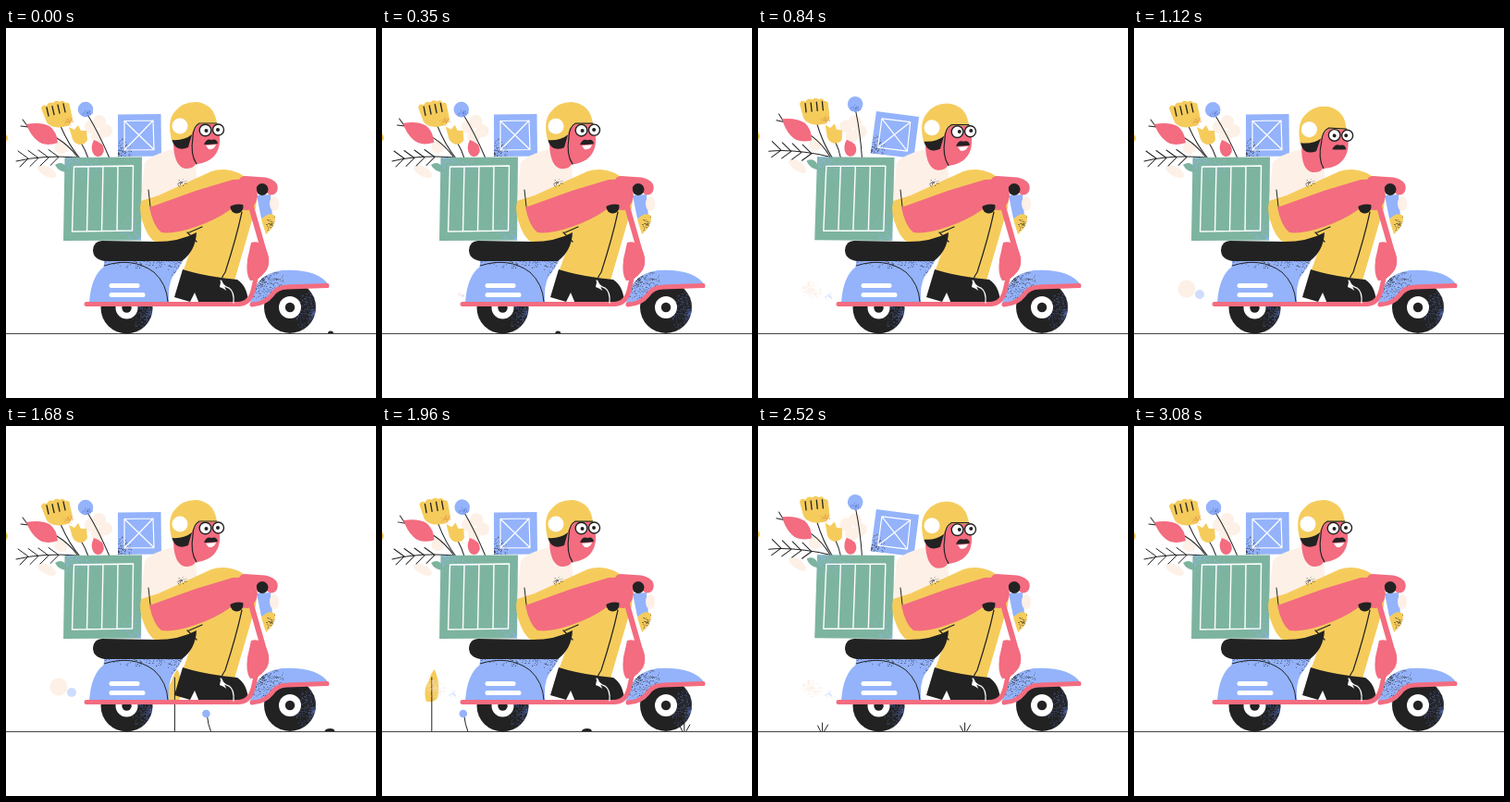
Animation of 400 by 400 pixels, one loop 3150 ms. Source, as an HTML page:

```html
<!DOCTYPE html>
<html lang="en">
<head>
<meta charset="utf-8">
<title>Scooter delivery</title>
<style>
html, body { margin: 0; width: 100%; height: 100%; overflow: hidden; background: #fff; }
svg { display: block; width: 100vw; height: 100vh; }
.k { fill: #222; } .p { fill: #f36c80; } .y { fill: #f5cc5c; } .b { fill: #94b3fb; }
.g { fill: #7db4a0; } .c { fill: #fdf0e6; } .w { fill: #fff; }
.lk, .lw, .lp { fill: none; stroke-linecap: round; stroke-linejoin: round; }
.lk { stroke: #222; } .lw { stroke: #fff; } .lp { stroke: #f36c80; }
</style>
</head>
<body>
<svg viewBox="0 0 400 400">
  <g id="strip">
    <path class="k" d="M348 330a3 2.6 0 0 1 6 0z M1116 330q1-3 6-3t5 3z"/>
    <path class="y" d="M948 298q-4-12 3-23q2-8 6-12q6 14 4 26q0 8-7 9z"/>
    <path class="lk" d="M954 272V330 M989 313q1 10 4 17"/>
    <circle class="b" cx="988" cy="311" r="4.3"/>
  </g>
  <path d="M0 330.5H400" stroke="#444"/>

  <g id="puff">
    <g id="cloud"><circle class="c" r="9.5"/><circle class="b" cx="14" cy="6" r="5" opacity=".45"/></g>
    <g id="dust"></g>
  </g>

  <circle id="edge" class="y" cx="-3" cy="119" r="5"/>
  <g id="load">
    <g id="petals" class="c">
      <circle cx="92" cy="107" r="7"/><circle cx="101" cy="101" r="7"/><circle cx="108" cy="111" r="7"/>
      <circle cx="99" cy="117" r="7"/><circle cx="60" cy="129" r="7"/>
    </g>
    <g id="branch">
      <ellipse class="c" cx="44" cy="155" rx="11" ry="5" transform="rotate(28 44 155)"/>
      <path class="lk" d="M11 144Q40 137 78 140"/>
      <path class="g" d="M53 148q7-5 12 2l2 6q-10 0-14-8z"/>
    </g>
    <g id="bulb">
      <path class="lk" d="M55 119Q68 127 77 139M24 107l-6-8M24 107l-8-1"/>
      <path class="p" d="M22 104Q37 101 47 106Q55 112 56 124Q41 129 33 121Q26 115 22 104Z"/>
    </g>
    <g id="tulip">
      <path class="lk" d="M59 106Q68 127 80 141"/>
      <path class="y" d="M38 87q1-5 6-3q2-5 7-3q3-4 7-1q4-3 6 1q5-1 5 4l3 13q0 7-10 9q-13 2-18-5z"/>
    </g>
    <g id="crown">
      <path class="lk" d="M81 124Q86 132 89 141"/>
      <path class="y" d="M68 107l6 3l4-5l3 6l6 0l1 10q-2 5-9 5q-7-2-8-9z"/>
    </g>
    <path class="p" d="M95 121q6 2 9 5q4 7-1 12q-6 3-9-3q-3-6 1-14z"/>
    <g id="ball">
      <path class="lk" d="M89 95Q101 115 112 141"/>
      <circle class="b" cx="86" cy="88" r="8.3"/>
    </g>
    <g id="box">
      <path id="boxFace" class="b" d="M121 93.500L167.500 93L168 138.500L121 139Z"/>
      <path class="lw" stroke-width="1.2" d="M128 100.500L159 100L160 131.500L128 132ZL160 131.500M159 100L128 132"/>
    </g>
    <path id="crate" class="g" d="M63.500 140L147 139.500L146 229.500L62 230Z"/>
    <path class="lw" stroke-width="1.4" d="M73.500 150L137.500 149L136.500 219L71.500 220ZM89 150L87.500 219.500M105 149.500L103.500 219.500M121 149.500L120 219"/>
  </g>

  <g id="scooter">
    <path id="body" class="b" d="M90 297Q92 268 106 258V250H192Q187 260 180 269Q175 278 176 297Z"/>
    <path class="lk" d="M106 257Q137 247 160 264Q174 277 175 296"/>
    <path class="lw" stroke-width="5" d="M114 278.500H142M114 288.500H148"/>
  </g>

  <g id="rider">
    <path class="c" d="M181 131Q156 137 150 146Q147 168 146 192L170 205L205 185Q207 165 205 148Z"/>
    <path class="y" d="M146 187Q143 200 150 216Q155 228 162 232Q185 233 206 222L191 264Q217 272 247 273L270 194Q274 168 252 157Q236 150 222 155L165 181Z"/>
    <path class="k" d="M104 230L162 231Q188 231 206 221Q205 241 190 252H107Q94 250 94 240Q95 230 104 230Z"/>
    <path class="lk" stroke-width="1.300" d="M196 221L206 231M198 221L212 215"/>
    <path class="k" d="M232 270L250 272Q261 279 262 297H244Z"/>
    <path class="k" d="M191 261Q210 267 233 270L231 280Q246 286 248 298H209L204 286L199 296L182 291Z"/>
  </g>

  <g id="front">
    <path class="b" d="M271 181L286 180L288 204L276 206Z"/>
    <ellipse class="c" cx="290" cy="190" rx="5" ry="8"/>
    <path id="lamp" class="y" d="M276 207Q284 198 291 203Q292 214 281 223Z"/>
    <path id="fender" class="b" d="M264 298Q268 266 298 262Q337 260 349 278L302 279Q289 282 284 291Q277 298 264 298Z"/>
    <path class="lp" stroke-width="5" d="M87 298.500H250Q263 299 267 284L272 262M266 299Q280 298 287 289Q293 280 304 280L347 278.500"/>
    <path class="lp" stroke-width="6" d="M265 193L281 249"/>
    <path class="p" d="M265 232Q275 229 281 239Q288 255 280 264Q272 274 264 273Q259 267 261 250Z"/>
  </g>

  <g id="arms">
    <path class="lp" stroke-width="13" d="M258 166.500L280 168Q288 170 287 174"/>
    <circle class="k" cx="277" cy="174.500" r="6.500"/>
    <path class="p" d="M155 194L205 176L245 164Q262 162 270 172Q276 188 262 197L243 196Q226 208 205 215Q182 223 168 221Q159 214 155 194Z"/>
    <path class="lk" d="M154 175L156 193"/>
    <circle class="k" cx="249.500" cy="193.500" r="7"/>
    <path class="lp" stroke-width="8" d="M238 191Q248 183 264 189"/>
    <path class="lk" stroke-width="1.200" d="M255 199Q249 227 237 264Q233 270 232 274"/>
    <path class="lw" stroke-width="1.300" d="M232 273Q234 279 241 281Q247 285 246 297"/>
  </g>

  <g id="head">
    <path class="p" d="M181 126L198 116L209 103L229 104L231 118Q232 134 221 142Q213 147 205 147Q203 152 194 152Q182 150 181 126Z"/>
    <path class="k" d="M179 120L201 115L197 129Q183 135 179 120Z"/>
    <path class="y" d="M179 121Q174 101 182 91Q191 79 207 80Q226 83 228 104L209 104Q203 108 201 115Q193 122 179 121Z"/>
    <circle class="w" cx="188" cy="106" r="8.500"/>
    <path class="lk" stroke-width="1.200" d="M228 103H209Q202 107 202 118Q199 137 206 147"/>
    <path class="p" d="M220 112Q230 115 229 121Q225 124 218 121Z"/>
    <g class="w" stroke="#222" stroke-width="1.400"><circle cx="215.500" cy="110.500" r="6.300"/><circle cx="229.500" cy="110" r="6"/></g>
    <g id="pupils" class="k"><circle cx="215.500" cy="111" r="2"/><circle cx="228" cy="110" r="2"/></g>
    <path id="mouth" class="w" d="M216 127L227 126Q225 132 219 131Z"/>
    <path class="k" d="M214 126Q217 119 222 121Q228 119 229 125Q222 126 214 126Z"/>
  </g>
</svg>
<script>
const NS = 'http://www.w3.org/2000/svg';
const STEP = 70, STEPS = 45, CYCLE = 24, SPEED = 32.15;
const $ = id => document.getElementById(id);
const svg = document.querySelector('svg');

let seed = 7;
const rnd = () => (seed = seed * 16807 % 2147483647) / 2147483647;

function make(tag, attrs) {
  const el = document.createElementNS(NS, tag);
  for (const k in attrs) el.setAttribute(k, attrs[k]);
  return el;
}
const add = (id, tag, attrs) => $(id).appendChild(make(tag, attrs));

// Dots thick at the centre, thin at the rim
function dots(cx, cy, rx, ry, n, size = .7) {
  let d = '';
  for (let i = 0; i < n; i++) {
    const a = rnd() * 2 * Math.PI, r = rnd();
    d += `M${(cx + rx * r * Math.cos(a)).toFixed(1)} ${(cy + ry * r * Math.sin(a)).toFixed(1)}h${size}v${size}h-${size}z`;
  }
  return d;
}

// Grain kept inside a shape, directly above it
function grain(id, fill, ...spot) {
  const shape = $(id), clipId = id + 'Clip';
  if (!$(clipId)) {
    const clip = svg.appendChild(make('clipPath', { id: clipId }));
    clip.appendChild(shape.cloneNode()).removeAttribute('id');
  }
  shape.after(make('path', { d: dots(...spot), fill, 'clip-path': `url(#${clipId})` }));
}

function wheel(id, x, y) {
  const disc = make('circle', { id, class: 'k', cx: x, cy: y, r: 28 });
  $('scooter').before(disc);
  disc.after(make('circle', { class: 'w', cx: x, cy: y, r: 12 }), make('circle', { class: 'k', cx: x, cy: y, r: 5.2 }));
  grain(id, '#4d609b', x + 26, y + 6, 20, 26, 650);
}

wheel('rearWheel', 130.5, 302.5);
wheel('frontWheel', 307, 302);
grain('body', '#222', 150, 250, 46, 10, 260);
grain('body', '#222', 190, 254, 16, 22, 160);
grain('fender', '#222', 276, 271, 24, 22, 430);
grain('lamp', '#222', 289, 214, 8, 12, 80);
grain('boxFace', '#222', 120, 139, 17, 22, 380);
grain('crate', '#94b3fb', 68, 140, 34, 25, 480);
grain('crate', '#94b3fb', 145, 228, 24, 28, 320);
add('ball', 'path', { d: dots(87, 91, 6, 5, 40), fill: '#5573c9' });
add('tulip', 'path', { d: dots(67, 101, 6, 5, 60), fill: '#e39b45' });
add('rider', 'path', { d: dots(190, 167, 6, 5, 32), fill: '#333' });
add('dust', 'path', { d: dots(0, 1, 11, 10, 130, 1), fill: '#f9e2d3' });
add('dust', 'path', { d: dots(20, 8, 5, 4, 30), fill: '#94b3fb' });

for (let i = 0; i < 4; i++) {
  const x = 24 + 11 * i, y = 141 - i / 2;
  add('branch', 'path', { class: 'lk', d: `M${x - 11} ${y - 8}L${x} ${y}l-9 9` });
  add('tulip', 'path', { class: 'lk', 'stroke-width': 1.3, d: `M${44 + 6 * i} ${86 - 1.4 * i}l2 9` });
}
for (const x of [1227, 1381])
  add('strip', 'path', { class: 'lk', d: `M${x - 2} 330l-3-6M${x} 330v-9M${x + 2} 330l4-7` });

const bell = (p, mid, width) => Math.exp(-(((p - mid) / width) ** 2));
const wave = (p, zero, mid) => Math.sin((p - zero) * Math.PI / 5) * bell(p, mid, 3.5);
const move = (id, t) => $(id).setAttribute('transform', t);
const show = (id, on) => $(id).style.display = on ? '' : 'none';

function drawLoad(p) {
  const hop = bell(p, 9, 1.6), land = bell(p, 12, 1.5);
  move('load', `translate(${-5 * hop} ${-7 * hop}) rotate(${land - 6 * hop} 104.5 184.5)`);
  move('box', `translate(0 ${-8 * bell(p, 10.3, 1.2)}) rotate(${7 * land} 144 139)`);

  const sway = 18 * wave(p, 10.3, 8.5);
  move('tulip', `rotate(${sway} 80 141)`);
  move('bulb', `rotate(${sway * .8} 77 139)`);
  move('crown', `rotate(${sway} 89 141)`);
  move('petals', `rotate(${sway * .6} 95 145)`);
  move('branch', `rotate(${8 * land - 2 * hop} 78 140)`);
  move('ball', `rotate(${26 * wave(p, 9.9, 10)} 112 141)`);
  move('edge', `translate(0 ${-4 * bell(p, 9.5, 3)})`);
}

function drawHead(p) {
  const nod = bell(p, 16, 2), jolt = bell(p, 10, 3);
  move('head', `translate(0 ${4 * nod + 2.5 * jolt}) rotate(${3.5 * nod} 194 130)`);
  move('pupils', `translate(${1 + 2 * jolt - nod} ${-jolt})`);
  show('mouth', nod < .5);
}

// A puff leaves the exhaust every eight steps, swells, then crumbles
function drawPuff(n) {
  const age = (n - 5) % 8, size = Math.min(1, (age + 1) / 4);
  show('puff', n >= 5 && n < 37);
  show('cloud', age < 5);
  show('dust', age >= 5);
  move('puff', `translate(${57 + 36 * (1 - size)} ${282 + 8 * (1 - size)}) scale(${size})`);
  $('dust').style.opacity = 2.35 - age * .25;
}

function draw(n) {
  const p = n % CYCLE;
  move('strip', `translate(${-n * SPEED} 0)`);
  drawLoad(p);
  drawHead(p);
  drawPuff(n);
}

const start = performance.now();
function tick() {
  draw(Math.floor((performance.now() - start) / STEP) % STEPS);
  requestAnimationFrame(tick);
}
tick();
</script>
</body>
</html>
```
